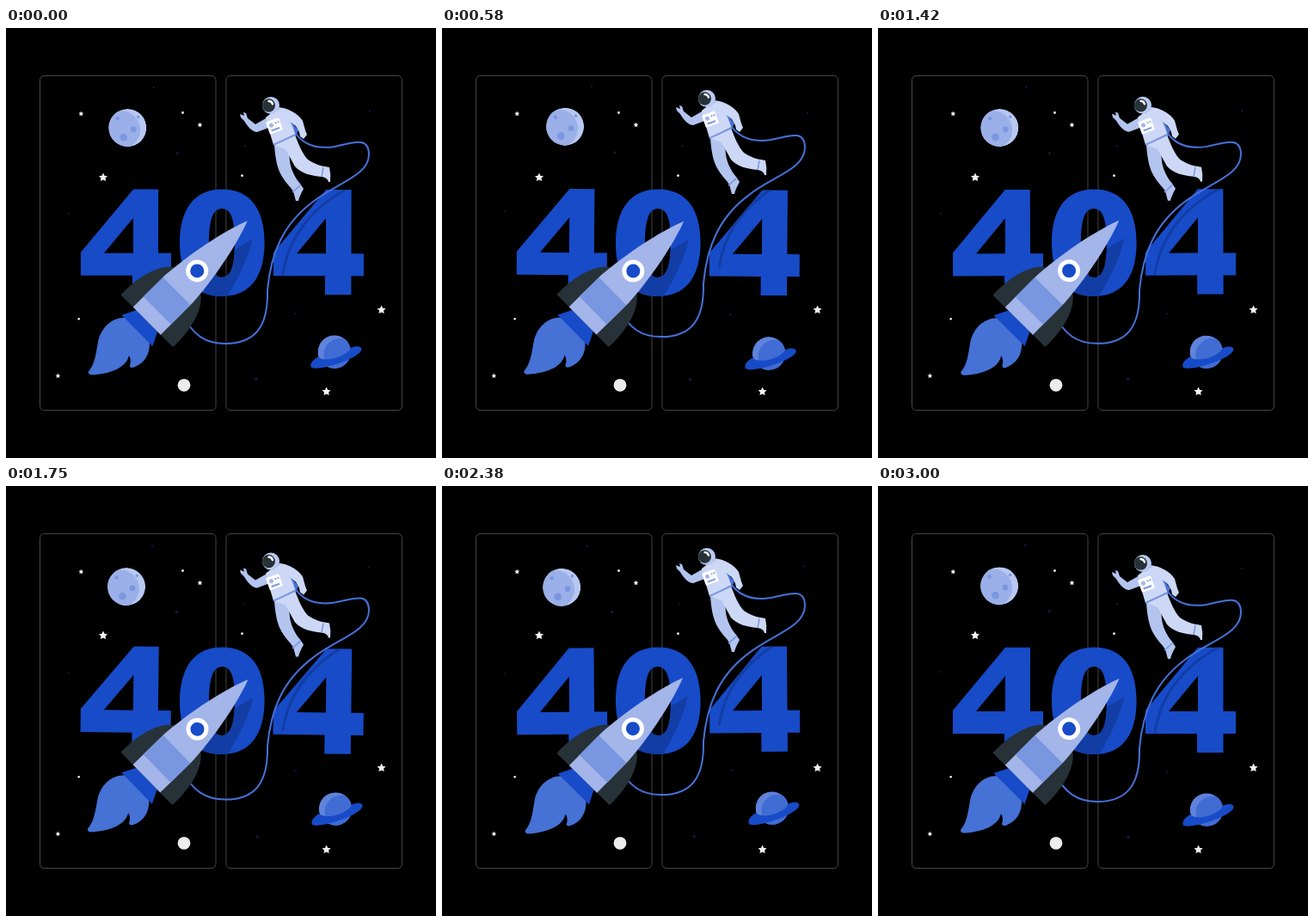
An HTML page that plays this animation: 500 px wide and 500 px high, repeating every 3.04 s.

```html
<!DOCTYPE html>
<html lang="en">
<head>
<meta charset="utf-8">
<title>404</title>
<style>
html, body { margin: 0; height: 100%; overflow: hidden; background: #000; }
svg { display: block; width: 100vw; height: 100vh; }
</style>
</head>
<body>
<svg viewBox="0 0 500 500" role="img" aria-label="404">
  <defs>
    <clipPath id="onDigits"><use href="#digits" clip-rule="evenodd"/></clipPath>
    <clipPath id="inMoon"><circle cx="141.2" cy="116.2" r="22"/></clipPath>
    <clipPath id="inPlanet"><circle cx="382" cy="376.5" r="19.3"/></clipPath>
  </defs>

  <g fill="none" stroke="#454545">
    <rect x="39.5" y="55.5" width="204.5" height="389" rx="5"/>
    <rect x="256" y="55.5" width="204.5" height="389" rx="5"/>
  </g>

  <g id="sky">
    <g id="dust" fill="#0d1a48"></g>
    <g clip-path="url(#inMoon)">
      <circle cx="141.2" cy="116.2" r="22" fill="#b7c8f2"/>
      <circle cx="134" cy="118.5" r="22" fill="#9bb0e8"/>
    </g>
    <g fill="#7b97e0">
      <circle cx="148" cy="118" r="3.4"/>
      <circle cx="136.5" cy="127.2" r="4.4"/>
      <circle cx="129.7" cy="105.5" r="2.3"/>
      <circle cx="153.5" cy="103.5" r="1.8"/>
    </g>
    <g clip-path="url(#inPlanet)">
      <circle cx="382" cy="376.5" r="19.3" fill="#5f83dc"/>
      <circle cx="389" cy="380" r="19.5" fill="#416cd3"/>
    </g>
    <path transform="translate(384 382.6) rotate(-15)" fill="#174bc8"
      d="M-20-6C-28-4-32 0-31 4C-26 11 26 9 31-1C32-5 26-7 19-6C14 2-14 4-20-6"/>
  </g>

  <g id="stars" fill="#f2f2f2">
    <circle cx="207" cy="415.3" r="7.4" fill="#ececec"/>
    <circle cx="205.5" cy="98.5" r="1.4"/>
    <circle cx="274.5" cy="171.7" r="1.4"/>
    <circle cx="84.7" cy="338.2" r="1.3"/>
  </g>

  <path id="digits" fill="#174bc8" fill-rule="evenodd" d="
    M148 187.7H177V262H192V288H177V310H147V288H87V261ZM148 221L114 262H148Z
    M251.3 187.5C285 187.5 300.6 212 300.6 250S285 312 251.3 312S202 288 202 250S218 187.5 251.3 187.5Z
    M251 210C240 210 236 224 236 250S240 290 251 290S266 276 266 250S262 210 251 210Z
    M372 187.7H401.5V262H416V288H401.5V310H371V288H311V261ZM372 221L338 262H372Z"/>
  <g clip-path="url(#onDigits)">
    <path class="float" d="M402 184C352 210 328 245 322 287" fill="none" stroke="#123da5" stroke-width="3"/>
    <path class="thrust" d="M286.5 245C282 266 271 289 256 314L226 318L240 275L266 257Z" fill="#123da5"/>
  </g>

  <path class="float" fill="none" stroke="#4771d9" stroke-width="2"
    d="M335 120C345 136 362 141 382 138C402 134 422 125 422 147C422 172 385 180 357 202C322 228 308 262 304 305C305 347 290 367 255 367C232 367 217 357 206 334"/>

  <g class="thrust">
    <path fill="#4671d5" d="M141 337C122 336 110 350 107 366C104 384 103 391 96 400Q96 404 101 403.5C122 402 140 395 143 381C146 385 145 390 144 393Q145 396 149 394.5C161 390 168 380 167 364Z"/>
    <g transform="translate(280.5 224) rotate(45)">
      <path d="M-17 164H17L25.5 181H-25.5Z" fill="#174bc8"/>
      <path d="M-21 98C-34 106-44 130-43 165H43C44 130 34 106 21 98Z" fill="#263238"/>
      <path d="M0 0C-8 20-19 62-22.7 112V165H22.7V112C19 62 8 20 0 0" fill="#a3b5e9"/>
      <path d="M-22.7 116H22.7V148H-22.7Z" fill="#7996e0"/>
      <circle cy="82.5" r="13" fill="#fff"/>
      <circle cy="82.5" r="8" fill="#174bc8"/>
    </g>
  </g>

  <g class="float">
    <!-- far limbs -->
    <path fill="#b3c4ef" d="M304 104L290 112L281 105L279 99L276 98L277 102L272 100L273 104L277 108C281 115 287 121 292 121L308 115Z"/>
    <path fill="#b3c4ef" d="M312 136C313 150 315 162 320 171C325 180 332 186 334 190L337 201L340 201Q341 196 346 187L342 181C335 173 331 163 330 155L328 132Z"/>
    <path d="M333 191L343 182" stroke="#7996e0" stroke-width="1.5"/>
    <!-- near limbs -->
    <path fill="#ccd8f6" d="M312 136L336 124C340 135 345 147 351 153C357 157 366 161 371 161L376 162Q378 170 377 179L375 179Q374 174 367 173C355 172 343 169 336 161L325 141Z"/>
    <path d="M369 162L367 173" stroke="#7996e0" stroke-width="1.5"/>
    <path fill="#ccd8f6" d="M302 104Q309 98 318 94L326 97Q334 111 337 123L311 136Q306 120 302 104Z"/>
    <path fill="#4771d9" d="M328 104L340 119L337 125Q334 114 328 104Z"/>
    <path fill="#ccd8f6" d="M316 92C329 93 340 100 345 108L348 119L350 124L346 129L342 126L341 121L337 114L324 104Z"/>
    <path d="M311 136L337 124" stroke="#7996e0" stroke-width="2"/>
    <g transform="translate(312 114) rotate(-20)">
      <rect x="-8" y="-7.5" width="16" height="15" rx="1" fill="#fff"/>
      <circle cx="-3" cy="-2" r="2.5" fill="#a3b5e9"/>
      <path d="M2-3H3.5M5-3H6.5" stroke="#4771d9" stroke-width="1.5"/>
      <path d="M-5 4H5" stroke="#7996e0" stroke-width="2"/>
    </g>
    <circle cx="308" cy="90" r="10" fill="#b9c9f2"/>
    <ellipse cx="305.5" cy="90" rx="7.5" ry="7.7" fill="#263238"/>
    <path d="M305.5 85Q309 85 310 88.5" fill="none" stroke="#fff" stroke-width="2.4" stroke-linecap="round"/>
  </g>
</svg>
<script>
const LOOP = 3040, LEAD = 40, TAU = 2 * Math.PI;
const $ = s => document.querySelectorAll(s);
const add = (id, tag, attrs) => {
  const el = document.createElementNS('http://www.w3.org/2000/svg', tag);
  for (const k in attrs) el.setAttribute(k, attrs[k]);
  $('#' + id)[0].append(el);
};
const move = (sel, transform) => $(sel).forEach(el => el.setAttribute('transform', transform));

function star(x, y, r) {
  const points = Array.from({ length: 10 }, (_, i) => {
    const a = i * TAU / 10, d = i % 2 ? r * 0.5 : r;
    return [x + d * Math.sin(a), y - d * Math.cos(a)];
  });
  add('stars', 'polygon', { points: points.join(' ') });
}

[[87.3, 99.8, 3], [225.5, 112.7, 3], [60.4, 404.6, 3],
 [113, 173.8, 5.3], [436.6, 327.8, 5.3], [372.6, 422.8, 5.3]].forEach(s => star(...s));

[[171.5, 69, 1.2], [199.3, 145.8, 1.7], [73, 216, 1.1], [278, 137, 1.1],
 [422.7, 96, 1.2], [336.5, 332, 1.2], [291, 408.2, 1.7]]
  .forEach(([cx, cy, r]) => add('dust', 'circle', { cx, cy, r }));

function draw(now) {
  const slow = (now + LEAD) / LOOP * TAU, fast = 2 * slow;
  const sway = 0.78 * Math.sin(fast);
  move('#sky', `rotate(${0.87 * Math.sin(slow)} 250 250)`);
  move('#digits', `rotate(${sway} 250 250)`);
  move('.thrust', `rotate(${sway} 195 308)`);
  move('.float', `translate(0 ${-4.3 * (1 - Math.cos(fast))})`);
}

const start = performance.now();
function tick() {
  draw((performance.now() - start) % LOOP);
  requestAnimationFrame(tick);
}
tick();
</script>
</body>
</html>
```
